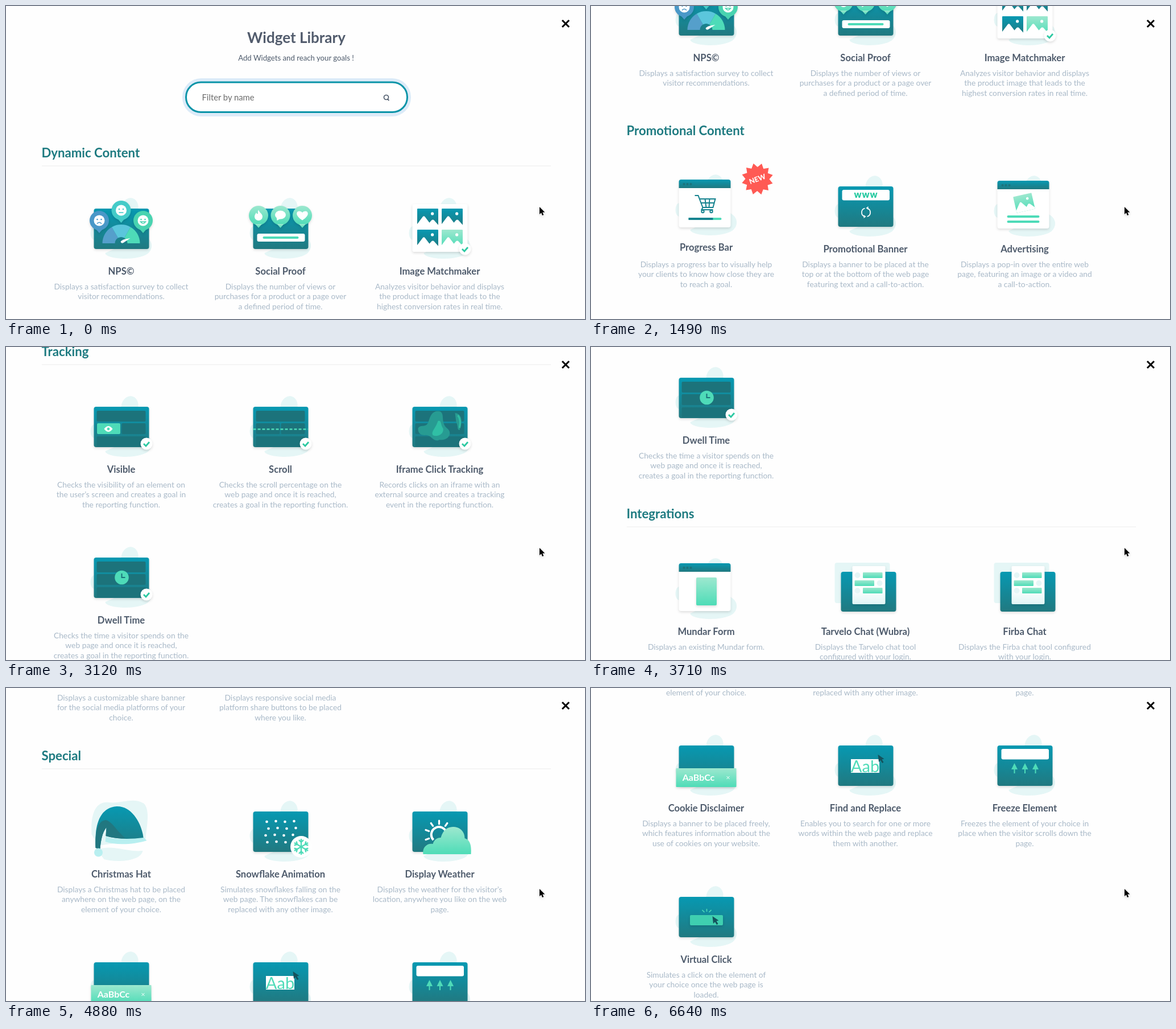
An HTML page that plays this animation: 1018 px wide and 550 px high, repeating every 7090 ms.

```html
<!DOCTYPE html>
<html lang="en">
<head>
<meta charset="utf-8">
<title>Widget Library</title>
<style>
html, body { margin: 0; width: 100%; height: 100%; overflow: hidden; background: #fefefe; }
svg { display: block; font-family: Lato, sans-serif; }
.mid text { text-anchor: middle; }
.name { font-weight: 700; font-size: 16.6px; fill: #4d5a6b; }
.desc { font-size: 13.8px; fill: #a9b9c8; }
.head { font-weight: 700; font-size: 22.2px; fill: #1d7a80; }
.sh { filter: drop-shadow(0 2px 2px #0002); }
</style>
</head>
<body>
<svg id="stage" width="1018" height="550" viewBox="0 0 1018 550">
  <defs>
    <linearGradient id="teal" x2="0" y2="1"><stop stop-color="#0799b2"/><stop offset="1" stop-color="#217980"/></linearGradient>
    <linearGradient id="mint" x2="0" y2="1"><stop stop-color="#9de8cf"/><stop offset="1" stop-color="#4edcb7"/></linearGradient>
    <linearGradient id="side"><stop stop-color="#4edcb7"/><stop offset="1" stop-color="#9de8cf"/></linearGradient>
    <linearGradient id="pale" x2="0" y2="1"><stop offset=".6" stop-color="#fff"/><stop offset="1" stop-color="#dff5f5"/></linearGradient>
  </defs>
  <g id="page">
    <g class="mid">
      <text x="510.5" y="65" font-size="26" font-weight="700" fill="#525c6d">Widget Library</text>
      <text x="510" y="95.5" font-size="13.2" fill="#4d5a6b">Add Widgets and reach your goals !</text>
    </g>
    <rect x="310" y="127" width="402" height="67" rx="33" fill="#dcebf8"/>
    <rect x="316.5" y="134" width="389" height="52.5" rx="26" fill="#fff" stroke="#0a94a8" stroke-width="3"/>
    <text x="344.5" y="166" font-size="14.8" fill="#6b6b6b">Filter by name</text>
    <path d="M671 164l2.5 2M672.5 160.5a4 4 0 1 1-8 0a4 4 0 1 1 8 0" fill="none" stroke="#4d5a6b" stroke-width="1.7"/>
  </g>
  <path d="M978 25l12 12m0-12l-12 12" stroke="#000" stroke-width="3"/>
  <path class="sh" d="M938 353v13l3-2.7 2 4.7 2.3-1-2-4.5h4.2z" stroke="#fff" paint-order="stroke"/>
</svg>
<script>
const TEAL = 'url(#teal)', MINT = 'url(#mint)', GREEN = '#4edbb8', PALE = '#e5f6f6', DARK = '#1c737b', INK = '#14525c';

const rect = (x, y, w, h, r = 0, fill = '#fff', more = '') =>
  `<rect x="${x}" y="${y}" width="${w}" height="${h}" rx="${r}" fill="${fill}" ${more}/>`;
const dot = (x, y, r, fill = '#fff', more = '') => `<circle cx="${x}" cy="${y}" r="${r}" fill="${fill}" ${more}/>`;
const path = (d, fill = '#fff', more = '') => `<path d="${d}" fill="${fill}" ${more}/>`;
const line = (d, color = GREEN, w = 3.5, more = '') =>
  `<path d="${d}" fill="none" stroke="${color}" stroke-width="${w}" ${more}/>`;
const at = (x, y, body, more = '') => `<g transform="translate(${x} ${y}) ${more}">${body}</g>`;
const text = (x, y, body, cls, more = '') => `<text x="${x}" y="${y}" class="${cls}" ${more}>${body}</text>`;
const each = (list, f) => list.map(f).join('');
const SHADOW = 'class="sh"', ROUND = 'stroke-linecap="round"';

const blob = '<ellipse cx="15" cy="-110" rx="15" ry="19" transform="rotate(12 15 -110)" fill="' + PALE + '"/>' +
  `<ellipse cx="-47" cy="-67" rx="7" ry="12" fill="${PALE}"/>` +
  path('M-28-32C-28-21 28-17 47-31C58-41 55-56 40-62Z', PALE);
const box = blob + rect(-48, -110, 97, 71, 4, TEAL, SHADOW);
const win = blob + rect(-48, -120, 91, 84, 4, '#fff', SHADOW) +
  path('M-48-105v-11q0-4 4-4h83q4 0 4 4v11z', TEAL) + each([-39, -33, -27], x => dot(x, -112, 2, DARK));
const rule = (y, a = -31, b = 26) => line(`M${a + 2} ${y}H${b - 2}`, GREEN, 4, ROUND);
const check = (x, y) => dot(x, y, 10.5, '#fff', SHADOW) + line(`M${x - 5} ${y}l4 4 6-7`, '#2cc9a2', 2.8);
const pointer = (x, y) => at(x, y, path('M0 0l1.5 13 3-3 3 5 2.5-1.5-3-5 4-1z', INK));
const rays = (x, y) => at(x, y, line('M0-4v-5M-4-3l-4-4M4-3l4-4', GREEN, 1.6));
const tiles = (x, y, w, h, gap) => each([0, 1, 2, 3], i => rect(x + i * gap, y, w, h, 4));
const pic = (x, y, w, h, turn = 0, fill = MINT) => at(x, y,
  `<g transform="scale(${w} ${h})">${rect(-.5, -.5, 1, 1, .03, fill)}${
    path('M-.5.5V.35L-.23-.06Q-.18-.12-.13-.05L.08.27L.18.14Q.24.08.3.14L.5.4V.5Z')}</g>` +
  dot(w * .22, -h * .22, w * .07), `rotate(${turn})`);
const pin = (x, y, fill, body) => at(x, y, `<g ${SHADOW}>${dot(0, 0, 17, fill)}${path('M-6 15L0 22L6 15Z', fill)}</g>` + body);
const face = (x, y, fill, mouth) => pin(x, y, fill, dot(0, 0, 9.5) + dot(-3.5, -2, 1.3, fill) + dot(3.5, -2, 1.3, fill) + line(mouth, fill, 1.6));
const grid = split => box + rect(-43, -103, 86, 19, 2, DARK) +
  (split ? rect(-43, -81, 42, 19, 2, DARK) + rect(1, -81, 42, 19, 2, DARK) : rect(-43, -81, 86, 19, 2, DARK)) +
  rect(-43, -58, 86, 18, 2, DARK);
const chat = rect(-54, -121, 97, 71, 4, PALE) + rect(-43, -105, 97, 70, 4, TEAL, SHADOW) +
  rect(-23, -115, 58, 67, 2, 'url(#pale)', SHADOW) +
  each([[-4.5, -104, -14], [-19, -90, 25], [-4.5, -77, -14]], ([x, y, d]) => rect(x, y, 34.5, 10, 1, MINT) + dot(d, y + 5, 5, PALE));

const bar = rect(-41, -104, 83.5, 18.5, 3);
const arc = (from, to, color) => line(`M${from}A22 22 0 0 1 ${to}`, color, 22);
const spikes = Array.from({ length: 24 }, (_, i) => {
  const r = i % 2 ? 21 : 28, a = i * Math.PI / 12 + .1;
  return (r * Math.cos(a)).toFixed(1) + ' ' + (r * Math.sin(a)).toFixed(1);
}).join('L');

const icons = {
  nps: box + arc('-22-49', '-11-68', '#559fcb') + arc('-11-68', '11-68', '#5bc6dc') + arc('11-68', '22-49', GREEN) +
    path('M-1-52Q1-56 16-58L4-50Q0-48-1-52Z') +
    face(-38.5, -89, '#4a98c8', 'M-4 5.5Q0 1 4 5.5') + face(0, -107, '#45cbc8', 'M-4 4H4') +
    face(38.5, -89, '#49d3b0', 'M-4.5 2Q0 8 4.5 2Z'),
  proof: box +
    pin(-38.5, -98, MINT, path('M0-10C1-5 7-3 7 2A7 7 0 0 1-7 2C-7-1-5-3-4-5Q-3-2-1-3Q-2-7 0-10Z')) +
    pin(0, -98, MINT, '<ellipse cy="-1" rx="9.5" ry="7.5" fill="#fff"/>' + path('M-7 2L-6 9L1 5Z')) +
    pin(38.5, -98, MINT, path('M0 8.5C-18-3-7-12 0-5C7-12 18-3 0 8.5Z')) +
    rect(-41, -66, 84, 14, 3) + rule(-59, -31, 32),
  match: blob + rect(-48, -118, 97, 84, 3, '#fff', SHADOW) +
    pic(-21, -94, 37, 32, 0, TEAL) + pic(22, -94, 37, 32, 0, TEAL) + pic(-21, -57, 37, 32, 0, TEAL) + pic(22, -57, 37, 32) +
    check(44.5, -39),
  progress: at(0, -2, win + line('M-20-92h6l8 21h18l4-15h-27M-9-79h23M-2-86l2 15M6-86l-1 15M-6-71l-2 4h20', '#16838f', 2) +
    dot(-6, -64, 2.2, 'none', 'stroke="#16838f" stroke-width="2"') + dot(9, -64, 2.2, 'none', 'stroke="#16838f" stroke-width="2"') +
    rule(-51, -31, 27) + line('M-31-51H12', '#16838f', 4)) +
    at(90, -123, path(`M${spikes}Z`, '#ff5a54') + text(0, 4.5, 'NEW', '', 'font-size="12.5" font-weight="800" fill="#fff"'), 'rotate(-20)'),
  banner: box + bar + text(1, -90, 'www', '', 'font-size="16" font-weight="900" fill="#25c9a0" letter-spacing="1"') +
    line('M-1-71.5A7.5 7.5 0 0 0-1-57M3-57A7.5 7.5 0 0 0 3-71.5', '#fff', 1.7) + path('M-3-54l4-3-4-3zM5-69l-4-3 4-3z'),
  advert: win + pic(-1, -81, 33, 29, -13) + rule(-57) + rule(-48),
  clock: box + rect(-40, -90, 80, 29, 2, MINT) + tiles(-31.5, -85, 14.5, 19, 16.6),
  count: box + rect(-53, -71, 106, 33, 1, MINT, SHADOW) + tiles(-35.5, -65, 16, 21, 18.6),
  simple: win + rule(-79) + rule(-69) + rule(-60),
  tooltip: box + rect(-34, -90, 70, 20, 3) + path('M-4-71L1-63L6-71Z') + rule(-80, -26, 28) +
    at(1, -55, line('M-5-3l-4-2M-3 2l-4 3M5-3l4-2M3 2l4 3M0 1v4', GREEN, 1.7)) + pointer(18, -64),
  video: win + at(-4, -73, rect(-23, -19, 46, 38, 2, MINT, SHADOW) + path('M-5-8L9 0L-5 8Z'), 'rotate(-13)'),
  image: win + pic(-4, -73, 46, 39, -13),
  visible: grid(true) + rect(-42.5, -81, 41, 19, 2, GREEN) + path('M-30-71Q-22.5-81-15-71Q-22.5-61-30-71Z') +
    dot(-22.5, -71, 2.4, GREEN) + check(44.5, -45),
  scroll: grid(true) + line('M-48-70.5H49', GREEN, 2.6, 'stroke-dasharray="5 3"') + check(44.5, -45),
  iframe: grid(false) + path('M-38-72C-34-80-24-72-20-83C-16-96-12-104 0-102C10-98 1-84 12-73C24-65 16-50 0-52C-12-46-14-62-26-60C-36-60-38-66-38-72Z', '#279b92') +
    path('M-3-85C4-87 1-78 6-72C8-62-4-56-12-60C-16-66-7-72-3-85Z', '#30bfa5') +
    path('M27-99C37-98 42-88 35-69C30-69 33-76 29-83Z', '#279b92') + line('M32-95Q38-87 35-73', '#30bfa5', 3) + check(44.5, -45),
  dwell: grid(false) + dot(1, -75, 12.3, GREEN) + line('M1-82v7h6', DARK, 2) + check(44.5, -45),
  form: win + rect(-17.5, -95, 36, 49, 2, MINT, SHADOW),
  chat,
  share: path('M8-117C28-128 46-114 41-94L30-70Z', '#e3ecf5') + path('M-46-80C-46-120-10-136 15-116L0-60Z', PALE) +
    path('M-54-66C-52-84-22-112 2-118C22-120 36-98 37-78C38-56 32-28 16-27C-8-27-56-44-54-66Z', MINT) +
    each([-38.5, 0, 38.5], x => dot(x, -75, 17, TEAL, SHADOW) + dot(x, -75, 8)),
  sidebar: box + rect(-50, -118, 33.5, 84, 0, 'url(#side)', SHADOW) + each([0, 1, 2, 3], i => dot(-33.5, -97 + i * 14.7, 6.4)),
  hat: path('M-52-70C-54-108-44-128-22-126C0-123 20-136 40-124C52-112 44-80 43-62L-40-50Z', PALE) +
    path('M-42-42C-20-54 10-38 38-41C34-22-8-20-30-26Z', PALE) +
    path('M-27-66C-4-58 18-62 38-66L45-59C22-52-8-50-28-57Z', '#b8eff0') +
    path('M-45-46C-47-84-39-117-8-119C20-120 37-86 39-64C15-61-8-61-27-67L-26-82C-34-72-36-56-37-44Z', TEAL) +
    path('M-45-46C-46-72-42-94-27-95C-16-93-8-75 8-63Q-12-62-27-67L-26-82C-34-72-36-56-37-44Z', '#217780') +
    dot(-40, -38, 7.5, '#b8eff0'),
  snow: box + each([-92, -80, -68, -56], (y, j) => each([-24, -8, 8, 24], (x, i) => j === 3 && i === 3 ? '' : dot(x + (j % 2 ? 4 : 0) - j, y - i % 2, 2.3))) +
    dot(36.5, -48, 19) + at(36.5, -48, each([0, 60, 120], a => at(0, 0, line('M0-14V14M-4-12l4 4 4-4M-4 12l4-4 4 4', GREEN, 2.4), `rotate(${a})`))),
  weather: box + at(-1, -69, line('M-10 9A13.5 13.5 0 1 1 13-3', '#fff', 4) +
    each([-110, -70, -35, 0, 35, 70], a => at(0, 0, line('M0-19v-6', '#fff', 3.2, ROUND), `rotate(${a})`))) +
    path('M-29-35C-31-47-22-55-12-53C-10-60-5-64 2-64C6-78 14-83 24-83C37-83 44-73 44-63C54-60 56-50 55-35Z', MINT),
  cookie: box + rect(-53, -70, 106, 33, 1, MINT, SHADOW) + text(-13.5, -48, 'AaBbCc', '', 'font-size="16" font-weight="700" fill="#fff"') +
    line('M36-56l5 5m0-5l-5 5', '#fff', 1),
  find: box + rect(-25.5, -86, 50, 24) + text(-.5, -63, 'Aab', '', `font-size="29" fill="${GREEN}"`) + pointer(22, -94),
  freeze: box + bar + each([-18, .5, 19], x => line(`M${x}-61v-9`, GREEN, 2) + path(`M${x - 5.5}-68L${x}-79L${x + 5.5}-68Z`, GREEN)),
  click: box + rect(-28.5, -78, 58, 18, 2, '#3fcfb0', SHADOW) + rays(1, -80) + pointer(11, -76)
};

// Section: heading, y, cards of [icon, title, description lines]
const sections = [
  ['Dynamic Content', 258, [
    ['nps', 'NPS©', 'Displays a satisfaction survey to collect|visitor recommendations.'],
    ['proof', 'Social Proof', 'Displays the number of views or|purchases for a product or a page over|a defined period of time.'],
    ['match', 'Image Matchmaker', 'Analyzes visitor behavior and displays|the product image that leads to the|highest conversion rates in real time.']]],
  ['Promotional Content', 594, [
    ['progress', 'Progress Bar', 'Displays a progress bar to visually help|your clients to know how close they are|to reach a goal.'],
    ['banner', 'Promotional Banner', 'Displays a banner to be placed at the|top or at the bottom of the web page|featuring text and a call-to-action.'],
    ['advert', 'Advertising', 'Displays a pop-in over the entire web|page, featuring an image or a video and|a call-to-action.'],
    ['clock', 'Countdown Clock', 'Displays a countdown to be placed|anywhere you like on the web page.'],
    ['count', 'Countdown Banner', 'Displays a banner featuring a|countdown, text and a call-to-action.'],
    ['simple', 'Simple Pop-in', 'Displays a pop-in over the web page,|featuring text and possibly a call-to-|action.'],
    ['tooltip', 'Tooltip', 'Displays a tooltip when hovering over|or clicking the element of your choice.'],
    ['video', 'Video Pop-in', 'Displays a pop-in over the web page,|featuring a video and possibly text and|a call-to-action.'],
    ['image', 'Image Pop-in', 'Displays a pop-in over the web page,|featuring an image, text and possibly a|call-to-action.']]],
  ['Tracking', 1460.6, [
    ['visible', 'Visible', 'Checks the visibility of an element on|the user’s screen and creates a goal in|the reporting function.'],
    ['scroll', 'Scroll', 'Checks the scroll percentage on the|web page and once it is reached,|creates a goal in the reporting function.'],
    ['iframe', 'Iframe Click Tracking', 'Records clicks on an iframe with an|external source and creates a tracking|event in the reporting function.'],
    ['dwell', 'Dwell Time', 'Checks the time a visitor spends on the|web page and once it is reached,|creates a goal in the reporting function.']]],
  ['Integrations', 2061.5, [
    ['form', 'Mundar Form', 'Displays an existing Mundar form.'],
    ['chat', 'Tarvelo Chat (Wubra)', 'Displays the Tarvelo chat tool|configured with your login.'],
    ['chat', 'Firba Chat', 'Displays the Firba chat tool configured|with your login.'],
    ['share', 'Social Sharing Buttons', 'Displays a customizable share banner|for the social media platforms of your|choice.'],
    ['sidebar', 'Social Sharing Sidebar', 'Displays responsive social media|platform share buttons to be placed|where you like.']]],
  ['Special', 2663.4, [
    ['hat', 'Christmas Hat', 'Displays a Christmas hat to be placed|anywhere on the web page, on the|element of your choice.'],
    ['snow', 'Snowflake Animation', 'Simulates snowflakes falling on the|web page. The snowflakes can be|replaced with any other image.'],
    ['weather', 'Display Weather', 'Displays the weather for the visitor’s|location, anywhere you like on the web|page.'],
    ['cookie', 'Cookie Disclaimer', 'Displays a banner to be placed freely,|which features information about the|use of cookies on your website.'],
    ['find', 'Find and Replace', 'Enables you to search for one or more|words within the web page and replace|them with another.'],
    ['freeze', 'Freeze Element', 'Freezes the element of your choice in|place when the visitor scrolls down the|page.'],
    ['click', 'Virtual Click', 'Simulates a click on the element of|your choice once the web page is|loaded.']]]
];

const card = ([icon, title, desc], i, top) => at(202.5 + 280 * (i % 3), Math.round(top + 207.5 + 265.3 * Math.floor(i / 3)),
  icons[icon] + text(0, icon === 'progress' ? 3 : 6, title, 'name') +
  each(desc.split('|'), (s, j) => text(0, 31.5 + j * 17.5, s, 'desc')));

const page = document.getElementById('page');
page.innerHTML += each(sections, ([title, y, cards]) =>
  text(62.5, Math.round(y) + 8, title, 'head') +
  (title.startsWith('Promo') ? '' : rect(63, Math.round(y) + 22.5, 895, 1, 0, '#ededed')) +
  `<g class="mid">${each(cards, (c, i) => card(c, i, y))}</g>`);

// Scroll position by screen refresh, smoothed between key points
const LOOP = 7090, START = 740, TICK = 147.4;
const keys = [[-1, 0], [5, 375], [11, 930], [16, 1453], [24, 2089], [28, 2544], [30, 2665], [33, 2925]];
const slope = i => i <= 0 || i >= keys.length - 1 ? 0 :
  (keys[i + 1][1] - keys[i - 1][1]) / (keys[i + 1][0] - keys[i - 1][0]);

function scrollAt(n) {
  const last = keys.length - 1;
  if (n <= keys[0][0]) return 0;
  if (n >= keys[last][0]) return keys[last][1];
  const i = keys.findIndex(k => k[0] > n) - 1;
  const [a, p] = keys[i], [b, q] = keys[i + 1], d = b - a, u = (n - a) / d, v = 1 - u;
  return p + (q - p) * u * u * (3 - 2 * u) + d * u * v * (slope(i) * v - slope(i + 1) * u);
}

const born = performance.now();
function draw() {
  const t = (performance.now() - born) % LOOP;
  const y = Math.round(scrollAt(Math.floor((t - START) / TICK)));
  page.setAttribute('transform', `translate(0 ${-y})`);
  requestAnimationFrame(draw);
}
draw();
</script>
</body>
</html>
```
